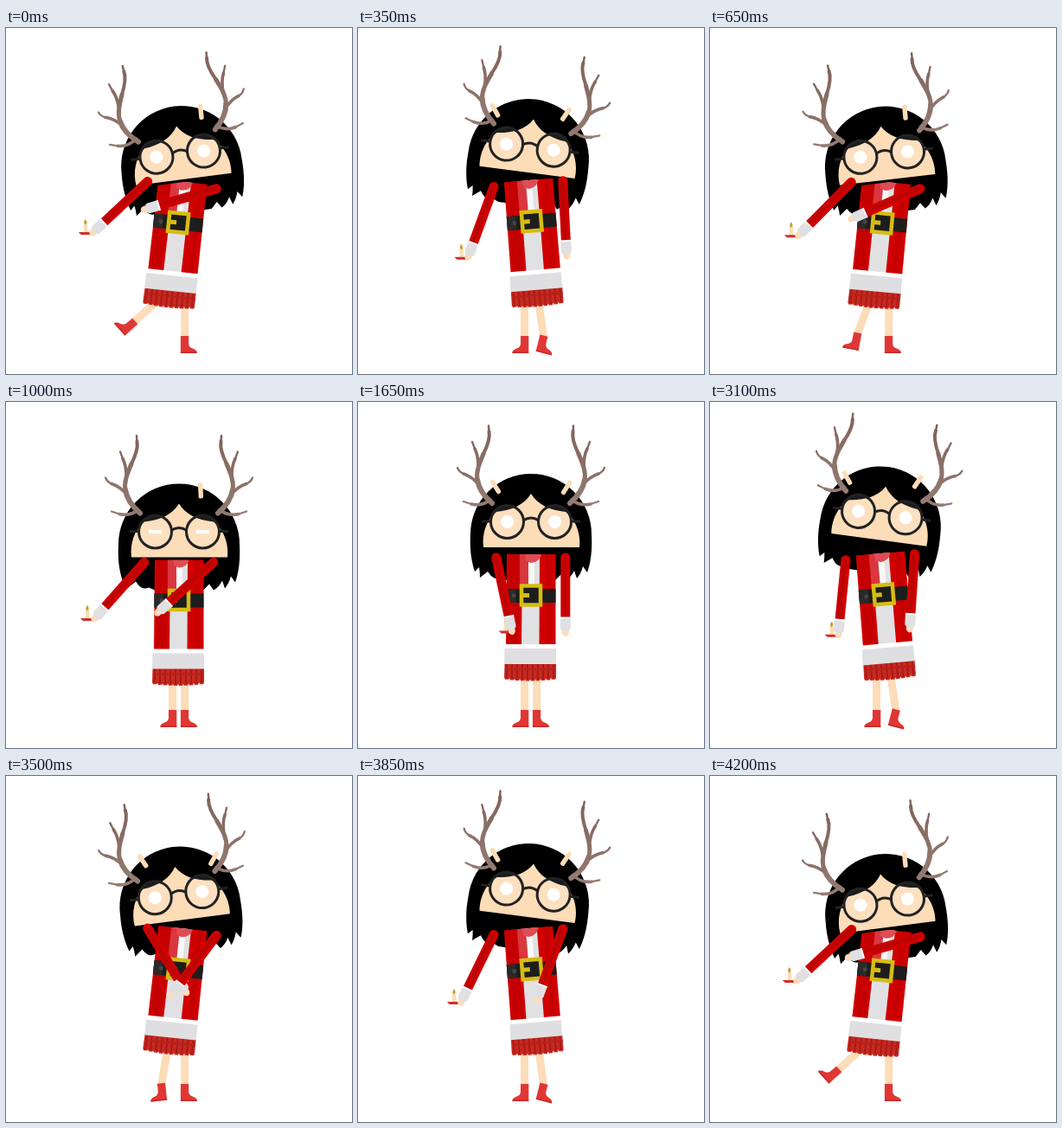
An HTML page for the animation above (4250 ms loop, 400x400 px).

```html
<!DOCTYPE html>
<html lang="en">
<head>
<meta charset="utf-8">
<title>Festive dance</title>
<style>
  html, body { margin: 0; width: 100%; height: 100%; overflow: hidden; background: #fff; }
  svg { display: block; width: 100vw; height: 100vh; }
</style>
</head>
<body>
<svg viewBox="0 0 400 400">
  <defs>
    <linearGradient id="horn" gradientUnits="userSpaceOnUse" x1="0" y1="27" x2="0" y2="120">
      <stop offset="0" stop-color="#806259"/>
      <stop offset="1" stop-color="#947c73"/>
    </linearGradient>
    <g id="antler" fill="none" stroke="url(#horn)" stroke-linecap="round" stroke-linejoin="round">
      <path stroke-width="6" d="M155 117Q140 104 138 90"/>
      <path stroke-width="5" d="M138 91C136 80 141 70 145 60"/>
      <path stroke-width="4" d="M145 60C150 50 153 42 151.500 34"/>
      <path stroke-width="2.500" d="M151.500 36L151 27.500"/>
      <path stroke-width="3.600" d="M139 74Q139 62 135 54M141 97Q132 86 122 83M153 113Q143 121 131 118"/>
      <path stroke-width="2.300" d="M135 54L132 46M122 83Q117 81 115 76M131 118L122 115"/>
    </g>
    <rect id="leg" x="-4.500" y="0" width="9" height="46" fill="#fddcb8"/>
    <g id="boot">
      <path d="M-4.500 44H4.800V64H-14Q-14.500 60 -9 58.500Q-4 57 -4.500 51Z" fill="#e03735"/>
      <path d="M-14 63H4.800" stroke="#c72b2b" stroke-width="1.500"/>
    </g>
    <g id="arm">
      <path d="M-4 82H4V87Q3 91 0 91Q-4 90 -4 86Z" fill="#fddcb8"/>
      <path d="M-5.500 70V0A5.500 5.500 0 0 1 5.500 0V70Z" fill="#d00000"/>
      <path d="M-3 70V0H1V70Z" fill="#b90505"/>
      <path d="M-6 69H6V82Q5 85 0 85Q-5 85 -6 82Z" fill="#e0e0e2"/>
      <path d="M-6 69.500H6" stroke="#fff" stroke-width="2"/>
    </g>
  </defs>

  <path id="hair" d="M130 153A70 70 0 0 1 270 153C271 172 269 186 265 197L260 190Q258 198 253 204L250 195Q246 203 240 206L235 199L228 206H172L165 203Q158 206 153 200L150 196L141 203Q141 197 140 191L135 196C131 184 129 170 130 153Z"/>

  <g id="legL"><use href="#leg"/><use id="bootL" href="#boot"/></g>
  <g id="legR"><use href="#leg"/><use id="bootR" href="#boot"/></g>

  <g id="body">
    <path id="skirt" fill="#c9281f"/>
    <path id="pleats" stroke="#a31c18" stroke-width="2"/>
    <path d="M170 309H229" stroke="#b5211b" stroke-width="2"/>
    <path d="M172 176H228.500V282H171Z" fill="#d00000"/>
    <path d="M174 176H186V282H174ZM218 176H223V282H218Z" fill="#c40000"/>
    <path d="M190 176H210L209.500 282H189Z" fill="#e1e1e3"/>
    <path d="M197 176H204V215H197Z" fill="#f8f8f8"/>
    <path d="M187 176H197V212H187Z" fill="#d9363e"/>
    <path d="M193 176H212Q210 185 200 186L194 184Z" fill="#e14b52"/>
    <rect x="171.500" y="216" width="57" height="16" fill="#1d1d1d"/>
    <path d="M171.500 216H182V232H171.500Z" fill="#2a2a2a"/>
    <circle cx="180" cy="224" r="2.500" fill="#444"/>
    <rect x="189" y="212.500" width="22" height="22" fill="#1d1d1d" stroke="#d6bc12" stroke-width="4.500"/>
    <path d="M190 221H198V226H190Z" fill="#d6bc12"/>
    <path d="M170 280H229V287H170Z" fill="#fff"/>
    <path d="M169.500 285H229V303H169Z" fill="#dfdfe1"/>
  </g>

  <g id="ears" fill="#fddcb8">
    <rect id="earL" x="-2.700" y="-9" width="5.400" height="18" rx="2"/>
    <rect id="earR" x="-2.700" y="-9" width="5.400" height="18" rx="2"/>
  </g>

  <g id="head">
    <path d="M145 167H256V171H145Z"/>
    <path d="M145 168C143 152 149 135 160 127C178 125 192 119 200 106C208 119 222 125 240 127C251 135 258 152 256 168Z" fill="#fddcb8"/>
    <g id="antlers">
      <use href="#antler"/>
      <use href="#antler" transform="matrix(-1 0 0 1 400 0)"/>
    </g>
    <g fill="#fff" fill-opacity=".11" stroke="#222" stroke-width="3">
      <circle cx="172.500" cy="138.500" r="19"/>
      <circle cx="227.500" cy="138.500" r="19"/>
      <path fill="none" d="M191 137Q200 131 209 137M143 138H153M247 138H257"/>
    </g>
    <g fill="#fff">
      <rect class="eye" x="165" width="15"/>
      <rect class="eye" x="220" width="15"/>
    </g>
  </g>

  <g id="candle">
    <path d="M-2 -1V-11H2.500V-1Z" fill="#f8dfb4"/>
    <path d="M0 -16.500Q3.500 -12 0 -10Q-3.500 -12 0 -16.500Z" fill="#c9a02c"/>
    <path d="M-8 -1.500H8L6 1.500H-5Z" fill="#cf2f2a"/>
  </g>
  <use id="armL" href="#arm"/>
  <use id="armR" href="#arm"/>
</svg>

<script>
const LOOP = 4250, STEP = 50, FULL_KICK = 38;

// time, sway (+ right, - left), head drop, body drop, left arm, right arm, kick
const KEYS = [
  [0, 1, 7, 1.5, 47, 74, FULL_KICK],
  [350, -1, -1, 0, 20, -3, 0],
  [700, 1, 8, 2, 46, 70, 12],
  [1000, 0, 11.5, 5.5, 41.5, 48, 0],
  [1170, -1.1, 6, 2, 16, 4, 0],
  [1500, 0, 0, 0, -6, 0, 0],
  [1650, 0, 0, 0, -12, 0, 0],
  [1900, 0, -1, 1, -10, 0, 0],
  [2200, 0, 0, 0, 0, 0, 0],
  [2800, 0, 0, 0, 0, 0, 0],
  [3150, -1.1, -9, -1, 6, 4, 0],
  [3500, 1, -1.5, 0, -31, 37, 0],
  [3850, -1, -5, 0, 26, 20, 0],
  [4200, 1, 7, 1.5, 47, 74, FULL_KICK],
  [LOOP, 1, 7, 1.5, 47, 74, FULL_KICK]
];

const $ = id => document.getElementById(id);
const place = (id, value) => $(id).setAttribute("transform", value);
const show = (id, on) => $(id).setAttribute("visibility", on ? "visible" : "hidden");
const at = (x, y, angle = 0) => `translate(${x} ${y}) rotate(${angle})`;

function poseAt(t) {
  const i = KEYS.findIndex(key => key[0] > t);
  const a = KEYS[i - 1], b = KEYS[i];
  const u = (t - a[0]) / (b[0] - a[0]);
  const eased = (1 - Math.cos(Math.PI * u)) / 2;
  return a.slice(1).map((v, k) => v + (b[k + 1] - v) * eased);
}

function turn(x, y, angle) {
  const r = angle * Math.PI / 180, c = Math.cos(r), s = Math.sin(r);
  return [x * c - y * s, x * s + y * c];
}

function buildSkirt() {
  let hem = "M169.500 302H229V319", folds = "";
  for (let i = 0; i < 10; i++) {
    const x = 229 - i * 6;
    const sag = 2 * Math.sin(Math.PI * (i + 0.5) / 10);
    hem += `L${x - 1} ${320.5 + sag}H${x - 5}L${x - 6} ${318.5 + sag}`;
    folds += `M${x - 3} 303V${319 + sag}`;
  }
  $("skirt").setAttribute("d", hem + "Z");
  $("pleats").setAttribute("d", folds);
}

function drawHead(sway, drop, right, left) {
  const shift = right * (1.7 + 0.2 * drop) - 3 * left;
  const move = tilt => `translate(${shift} ${drop}) rotate(${tilt} 200 153)`;
  place("hair", move(-7.4 * sway));
  place("head", move(-7.4 * sway));
  place("ears", move(-2.5 * sway));
  place("antlers", `rotate(${-0.25 * Math.max(0, drop) * sway} 200 153)`);

  const dipped = drop > 5;
  place("earL", at(159, 98, -32));
  place("earR", dipped ? at(225, 91, -3) : at(241, 99, 32));
  show("earL", !dipped);
}

function drawLegs(right, left, kick) {
  place("legL", at(192.5 - 5 * right - 0.15 * kick, 312 - 0.07 * kick, 10 * right + kick));
  place("legR", at(206.7 + 1.5 * left, 312, -8 * left) + " scale(-1 1)");
  place("bootL", `rotate(${-16 * right * (1 - kick / FULL_KICK)} 0 46)`);
  place("bootR", `rotate(${-22 * left} 0 46)`);
}

function drawArms(lean, drop, armL, armR) {
  const shoulder = side => {
    const [x, y] = turn(40 * side, -35, lean);
    return [199.8 + x, 215 + y + drop];
  };
  const [lx, ly] = shoulder(-1), [rx, ry] = shoulder(1);
  place("armL", at(lx, ly, armL));
  place("armR", at(rx, ry, armR));

  const [hx, hy] = turn(0, 88, armL);
  place("candle", at(lx + hx - 7.5, ly + hy));
  show("candle", armL > -22);
}

function drawEyes(t) {
  const open = Math.min(1, Math.max(0.27, Math.abs(t - 1000) / 120));
  document.querySelectorAll(".eye").forEach(eye => {
    eye.setAttribute("height", 15 * open);
    eye.setAttribute("y", 138.5 - 7.5 * open);
    eye.setAttribute("rx", open < 0.5 ? 1 : 7.5);
    eye.setAttribute("ry", open < 0.5 ? 1 : 7.5 * open);
  });
}

function draw(t) {
  const [sway, headDrop, bodyDrop, armL, armR, kick] = poseAt(t);
  const right = Math.max(0, sway), left = Math.max(0, -sway);
  const lean = 6 * right - 4.8 * left;

  place("body", `translate(0 ${bodyDrop}) rotate(${lean} 199.5 215)`);
  drawHead(sway, headDrop, right, left);
  drawLegs(right, left, kick);
  drawArms(lean, bodyDrop, armL, armR);
  drawEyes(t);
}

function tick() {
  const t = performance.now() % LOOP;
  draw(Math.floor(t / STEP) * STEP);
  requestAnimationFrame(tick);
}

buildSkirt();
tick();
</script>
</body>
</html>
```
